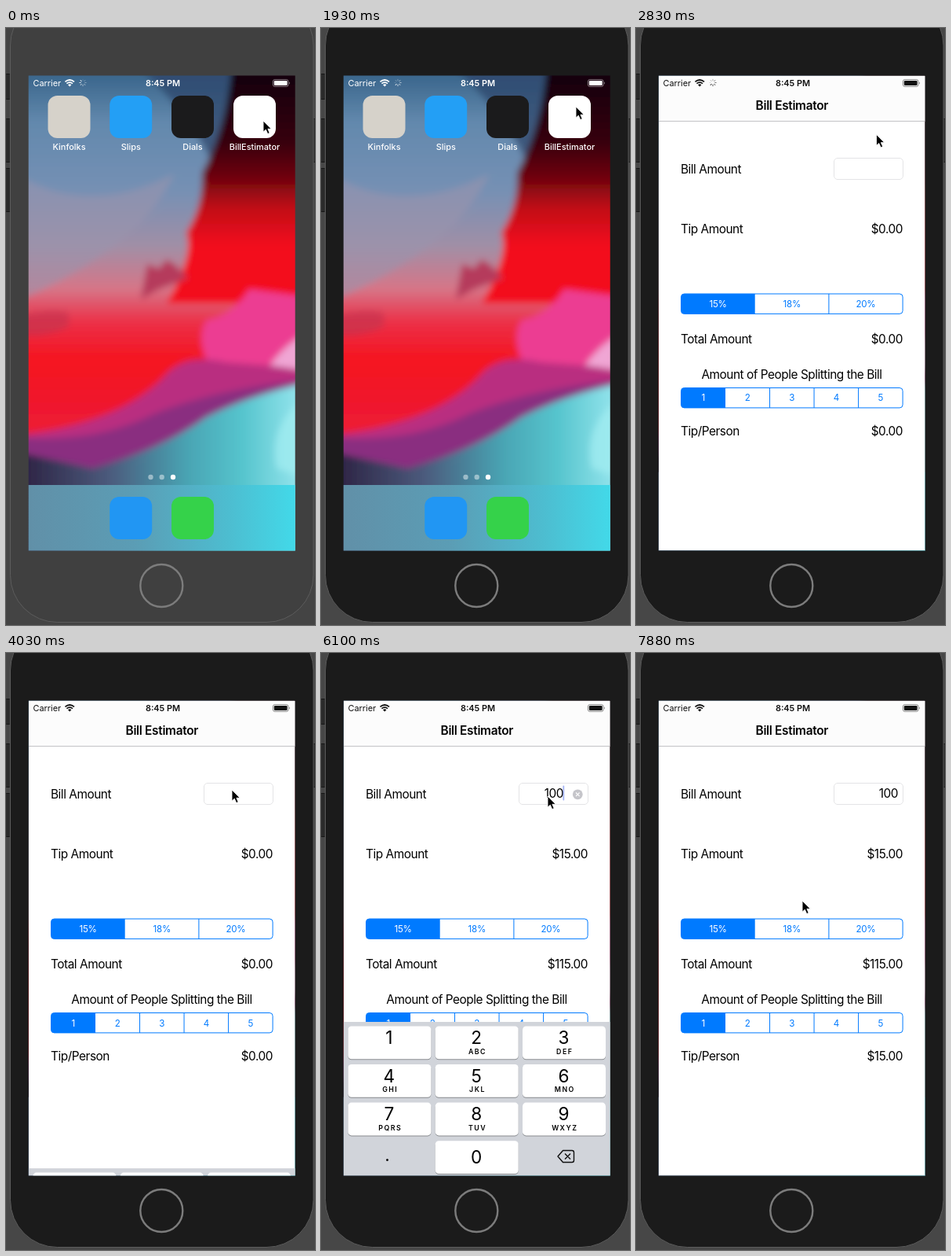
An HTML page for the animation above (8 s loop, 394 px wide and 759 px high).

```html
<!DOCTYPE html>
<html lang="en">
<head>
<meta charset="utf-8">
<title>Bill Estimator</title>
<style>
  html, body { margin: 0; width: 100%; height: 100%; overflow: hidden; background: #474747; }
  svg { display: block; width: 394px; height: 759px; font-family: Inter, sans-serif; }
  .label { font-size: 15.4px; letter-spacing: -.03em; }
  .title { font-size: 15.4px; font-weight: 600; letter-spacing: -.02em; }
  .small { font-size: 10.9px; }
  .time { font-size: 10.9px; font-weight: 600; }
  .app-name { font-size: 10.9px; font-weight: 500; fill: #fff; }
  .seg { font-size: 11.6px; letter-spacing: -.02em; }
  .digit { font-size: 22.6px; }
  .letters { font-size: 8.8px; font-weight: 600; letter-spacing: 1.5px; }
  .mid { text-anchor: middle; }
  .end { text-anchor: end; }
</style>
</head>
<body>
<svg id="stage" viewBox="0 0 394 759"></svg>
<script>
const LOOP = 8000;
const SCREEN = { x: 28.7, y: 60.4, w: 340, h: 604 };
const ICON = { x: 290, y: 86, size: 54 };
const BLUE = '#007aff';
const KEYBOARD_H = 195.6;

const text = (x, y, cls, str, attrs = '') => `<text x="${x}" y="${y}" class="${cls}" ${attrs}>${str}</text>`;
const box = (x, y, w, h, rx, attrs) => `<rect x="${x}" y="${y}" width="${w}" height="${h}" rx="${rx}" ${attrs}/>`;
const gradient = (id, stops, dir) => `<linearGradient id="${id}" gradientUnits="userSpaceOnUse" ${dir}>` +
  stops.map(([at, c]) => `<stop offset="${at}" stop-color="${c}"/>`).join('') + '</linearGradient>';
const down = 'x1="0" y1="60" x2="0" y2="665"';
const across = 'x1="29" y1="0" x2="369" y2="0"';

function spinner() {
  let ticks = '';
  for (let i = 0; i < 8; i++) {
    ticks += `<path d="M0-2.2V-4.6" transform="rotate(${i * 45})" opacity="${.15 + i * .1}"/>`;
  }
  return `<g transform="translate(98 69.5)" stroke-width="1"><g class="spin">${ticks}</g></g>`;
}

function statusBar(color) {
  return `<g fill="${color}" stroke="none">
    ${text(34.5, 74, 'small', 'Carrier')}
    ${text(200, 74, 'time mid', '8:45 PM')}
    <g fill="none" stroke="${color}">
      <path d="M75.4 68.4Q81.2 63.6 87 68.4M77.4 70.7Q81.2 67.6 85 70.7" stroke-width="1.7"/>
      ${box(340.4, 65.6, 19.6, 8.8, 2.4, 'stroke-width=".8" stroke-opacity=".6"')}
      ${spinner()}
    </g>
    <path d="M79 72.3Q81.2 70.4 83.4 72.3L81.2 74.6Z"/>
    ${box(341.8, 67, 16.8, 6, 1.2, '')}
    <path d="M361 68.6Q362.8 70 361 71.4Z" opacity=".6"/>
  </g>`;
}

function wallpaper() {
  return `<g filter="url(#soft)">
    <rect x="0" y="30" width="394" height="660" fill="url(#sky)"/>
    <path d="M160 40H300Q295 120 262 170Q235 110 160 40Z" fill="#2b4468" opacity=".7"/>
    <path d="M20 190Q110 240 215 185Q170 280 20 345Z" fill="#9a95ae" opacity=".6"/>
    <path d="M288 40H410V350H205Q240 290 230 260Q252 225 250 185Q284 120 288 40Z" fill="url(#dark)"/>
    <path d="M172 345L180 300L195 306L205 294L218 303L232 318L195 332Z" fill="#b53a5c"/>
    <path d="M20 365Q60 355 80 362V380Q50 395 20 390Z" fill="#c8324f" opacity=".7"/>
    <path d="M410 345L310 332Q290 365 255 372Q240 400 265 440L410 450Z" fill="#ec3c92"/>
    <path d="M410 375Q355 395 330 440L410 455Z" fill="#f0a6d4"/>
    <path d="M10 518Q140 505 200 445Q225 412 280 425L345 430L410 440V600H10Z" fill="#b92f80"/>
    <path d="M10 520Q110 530 190 490Q280 455 410 445V600H10Z" fill="#8a2f80"/>
    <path d="M10 538L110 560Q200 535 255 495Q320 462 410 446V690H10Z" fill="url(#sea)"/>
    <path d="M410 455Q330 490 345 560L410 580Z" fill="#a4eef2" opacity=".7"/>
  </g>`;
}

function homeIcons() {
  const apps = [['Kinfolks', 53.5, '#d6d2ca'], ['Slips', 132.2, '#239ff5'],
    ['Dials', 211, '#1b1b1c'], ['BillEstimator', ICON.x, '#fff']];
  const tile = (x, y, c) => box(x, y, ICON.size, ICON.size, 12, `fill="${c}"`);
  return apps.map(([name, x, c]) => tile(x, ICON.y, c) + text(x + 27, 154.5, 'app-name mid', name)).join('') +
    box(ICON.x, ICON.y, ICON.size, ICON.size, 12, 'id="press"') +
    [184.5, 198.7, 213].map((x, i) =>
      `<circle cx="${x}" cy="571" r="3.2" fill="#fff" opacity="${i < 2 ? .45 : 1}"/>`).join('') +
    tile(132.2, 596, '#2196f3') + tile(211, 596, '#35d24a');
}

function segments(y, names) {
  const x = 57.5, w = 282.6, h = 25.4, step = w / names.length;
  return `<path d="M${x + step} ${y}H${x + 4}Q${x} ${y} ${x} ${y + 4}V${y + h - 4}Q${x} ${y + h} ${x + 4} ${y + h}H${x + step}Z" fill="${BLUE}"/>` +
    box(x, y, w, h, 4, `fill="none" stroke="${BLUE}"`) +
    names.map((n, i) =>
      (i > 1 ? `<path d="M${x + step * i} ${y}v${h}" stroke="${BLUE}"/>` : '') +
      text(x + step * (i + .5), y + 17, 'seg mid', n, `fill="${i ? BLUE : '#fff'}"`)).join('');
}

function keyboard() {
  const keys = ['', 'ABC', 'DEF', 'GHI', 'JKL', 'MNO', 'PQRS', 'TUV', 'WXYZ'];
  const key = (col, row, n, letters) => {
    const x = 34.4 + col * 111.3, y = 474.4 + row * 48.6, cx = x + 53;
    return box(x, y + 1, 106, 41.8, 4.5, 'fill="#898c90"') + box(x, y, 106, 41.8, 4.5, 'fill="#fff"') +
      text(cx - .5, y + (n ? 22.8 : 29), 'digit mid', n) + text(cx + .8, y + 35.4, 'letters mid', letters);
  };
  return box(28, 469, 342, 200, 0, 'fill="#d1d4da"') +
    keys.map((l, i) => key(i % 3, Math.floor(i / 3), i + 1, l)).join('') + key(1, 3, 0, '') +
    text(84.5, 646, 'digit mid', '.') +
    `<path d="M308.5 632.5H320Q322.5 632.5 322.5 635V645Q322.5 647.5 320 647.5H308.5L302 640ZM311 636.5l7 7m0-7l-7 7"
      fill="none" stroke="#111" stroke-width="1.4" stroke-linejoin="round"/>`;
}

function app() {
  const { x, y, w, h } = SCREEN;
  return box(x, y, w, h, 0, 'fill="#fff"') + box(x, y, w, 58, 0, 'fill="#fcfcfc"') +
    `<path d="M${x} 118.5h${w}" stroke="#c4c4c6"/>` + statusBar('#111') +
    text(198.8, 104, 'title mid', 'Bill Estimator') +
    text(57, 185.4, 'label', 'Bill Amount') +
    box(252.5, 165.5, 88, 27, 4.5, 'fill="#fff" stroke="#e4e4e6"') +
    text(334, 184.2, 'label end', '', 'id="bill"') +
    box(0, 168.5, 1.8, 19, .9, 'id="caret" fill="#4a6bee"') +
    `<g id="clear"><circle cx="327.3" cy="179.8" r="6.4" fill="#c5c5ca"/>
      <path d="M325 177.5l4.6 4.6m0-4.6l-4.6 4.6" stroke="#fff" stroke-width="1.1"/></g>` +
    text(57, 261.2, 'label', 'Tip Amount') + text(340, 261.2, 'label end', '', 'id="tip"') +
    segments(338, ['15%', '18%', '20%']) +
    text(57, 400.6, 'label', 'Total Amount') + text(340, 400.6, 'label end', '', 'id="total"') +
    text(198.5, 445.6, 'label mid', 'Amount of People Splitting the Bill') +
    segments(457.5, [1, 2, 3, 4, 5]) +
    text(57, 517.6, 'label', 'Tip/Person') + text(340, 517.6, 'label end', '', 'id="share"') +
    `<g id="keys">${keyboard()}</g>`;
}

const sideButton = (x, y, h) => box(x, y, 7, h, 1.5, 'fill="#2b2b2b" stroke="#161616"');

document.getElementById('stage').innerHTML = `
  <defs>
    <filter id="soft" x="-5%" y="-5%" width="110%" height="110%"><feGaussianBlur stdDeviation="4"/></filter>
    <clipPath id="screenClip">${box(SCREEN.x, SCREEN.y, SCREEN.w, SCREEN.h, 0, '')}</clipPath>
    <clipPath id="appClip">${box(SCREEN.x, SCREEN.y, SCREEN.w, SCREEN.h, 0, 'id="window"')}</clipPath>
    ${gradient('sky', [[0, '#3a668c'], [.1, '#6389ad'], [.24, '#7590b4'], [.36, '#a18fa6'],
      [.45, '#d77587'], [.52, '#ec2f47'], [.6, '#f5141f'], [.72, '#ee1a32']], down)}
    ${gradient('dark', [[0, '#15060d'], [.14, '#36040b'], [.22, '#74060f'], [.28, '#c20a18'], [.36, '#f3101c']], down)}
    ${gradient('sea', [[0, '#2f2748'], [.3, '#4b5a7c'], [.6, '#4aa5b4'], [.8, '#55c4cd'], [1, '#8fe2ea']], across)}
    ${gradient('dock', [[0, '#6190a8'], [.4, '#5b9db5'], [.75, '#4dbdd0'], [1, '#42d9e9']], across)}
  </defs>
  <rect id="desk" width="394" height="759"/>
  ${sideButton(-1, 58.5, 32)}${sideButton(-1, 115.5, 55)}${sideButton(-1, 178.5, 55)}${sideButton(390, 115.5, 55)}
  ${box(5.5, -38, 386.5, 793.5, 60, 'id="body" stroke="#5c5c5c"')}
  <circle cx="198.3" cy="709" r="27" fill="none" stroke="#7c7c7c" stroke-width="2.4"/>
  <g clip-path="url(#screenClip)">
    ${wallpaper()}
    <g id="home">
      ${box(-20, 581, 440, 130, 0, 'fill="url(#dock)"')}
      <g id="icons">${homeIcons()}</g>
    </g>
    <g id="homeStatus">${statusBar('#fff')}</g>
    <rect id="dim" x="20" y="50" width="360" height="630"/>
    <g id="app" clip-path="url(#appClip)">${app()}</g>
  </g>
  <path id="cursor" d="M0 0V14.2L3.3 11.2L5.7 16.6L8.2 15.5L5.9 10.3H10.3Z" stroke="#fff" stroke-width=".9"/>`;

const ui = {};
document.querySelectorAll('[id]').forEach(el => { ui[el.id] = el; });
const spinners = document.querySelectorAll('.spin');
const set = (el, attrs) => { for (const k in attrs) el.setAttribute(k, attrs[k]); };
const clamp = v => Math.min(1, Math.max(0, v));
const mix = (a, b, p) => a + (b - a) * p;

// Critically damped spring from 0 to 1.
function spring(t, start, rate) {
  const x = Math.max(0, t - start) / 1000 * rate;
  return 1 - (1 + x) * Math.exp(-x);
}

const beats = [[0, 8], [1200, 7], [2230, 12], [4030, 5], [4770, 2], [5060, 3],
  [5500, 7], [6550, 7], [7580, 2], [7880, 1], [LOOP, 1]];
function hold(t) {
  const i = beats.findIndex(b => b[0] > t) - 1;
  const [from, count] = beats[i];
  const step = (beats[i + 1][0] - from) / count;
  return from + Math.floor((t - from) / step + 1e-6) * step;
}

const path = [[1350, 328, 118], [1780, 325, 100], [2300, 325, 100], [3280, 292, 163], [3430, 288, 174],
  [4100, 288, 174], [4330, 289, 182], [6480, 289, 182], [7100, 244, 219], [7600, 244, 219], [7880, 212, 315]];
function cursorAt(t) {
  const i = path.findIndex(p => p[0] > t);
  if (i === 0) return path[0].slice(1);
  if (i < 0) return path[path.length - 1].slice(1);
  const [a, b] = [path[i - 1], path[i]];
  const p = (t - a[0]) / (b[0] - a[0]), e = p * p * (3 - 2 * p);
  return [mix(a[1], b[1], e), mix(a[2], b[2], e)];
}

function drawLaunch(t) {
  const p = spring(t, 1997, 18), { x, y, w, h } = SCREEN, s = ICON.size;
  const width = mix(s, w, p), height = mix(s, h, p ** 1.4), k = width / w;
  const cx = mix(ICON.x + s / 2, x + w / 2, p), cy = mix(ICON.y + s / 2, y + h / 2, p);
  set(ui.app, {
    transform: `translate(${cx - width / 2} ${cy - height / 2}) scale(${k}) translate(${-x} ${-y})`,
    opacity: clamp(p * 2), visibility: p > 0 ? 'visible' : 'hidden'
  });
  set(ui.window, { height: height / k, rx: 12 * (1 - p ** 8) / k });
  set(ui.home, { transform: `translate(198.7 362.4) scale(${1 - .075 * p}) translate(-198.7 -362.4)` });
  set(ui.icons, { opacity: 1 - .55 * p });
  set(ui.homeStatus, { opacity: 1 - .85 * p });
  set(ui.dim, { opacity: .64 * p });
  set(ui.press, { opacity: t > 1900 ? .44 : 0 });
}

function drawForm(t) {
  const editing = t > 4100 && t < 7260;
  const typed = t < 5190 ? 0 : t < 5340 ? 1 : t < 5490 ? 2 : 3;
  const bill = '100'.slice(0, typed), tip = bill * .15;
  const money = v => '$' + v.toFixed(2);
  const right = editing && typed ? 309 : 334;
  ui.bill.textContent = bill;
  ui.bill.setAttribute('x', right);
  ui.tip.textContent = ui.share.textContent = money(tip);
  ui.total.textContent = money(+bill + tip);
  set(ui.clear, { opacity: editing && typed ? 1 : 0 });

  const phase = Math.max(0, t - (typed ? 5500 : 4460)) % 1050;
  const lit = phase > 1000 ? 1 : clamp((650 - phase) / 100);
  set(ui.caret, { x: typed ? 308.4 : 332.6, opacity: editing ? lit : 0 });

  const shown = spring(t, 4001, 12) - spring(t, 7260, 12);
  set(ui.keys, { transform: `translate(0 ${KEYBOARD_H * (1 - shown)})` });
}

function draw(t) {
  const active = t >= 1350;
  set(ui.desk, { fill: active ? '#474747' : '#444' });
  set(ui.body, { fill: active ? '#1b1b1b' : '#404040' });
  drawLaunch(t);
  drawForm(t);
  spinners.forEach(s => set(s, {
    transform: `rotate(${Math.floor(t / 125) * 45})`, visibility: t < 3280 ? 'inherit' : 'hidden'
  }));
  set(ui.cursor, { transform: `translate(${cursorAt(t)})` });
}

const begin = performance.now();
function tick() {
  draw(hold((performance.now() - begin) % LOOP));
  requestAnimationFrame(tick);
}
tick();
</script>
</body>
</html>
```
